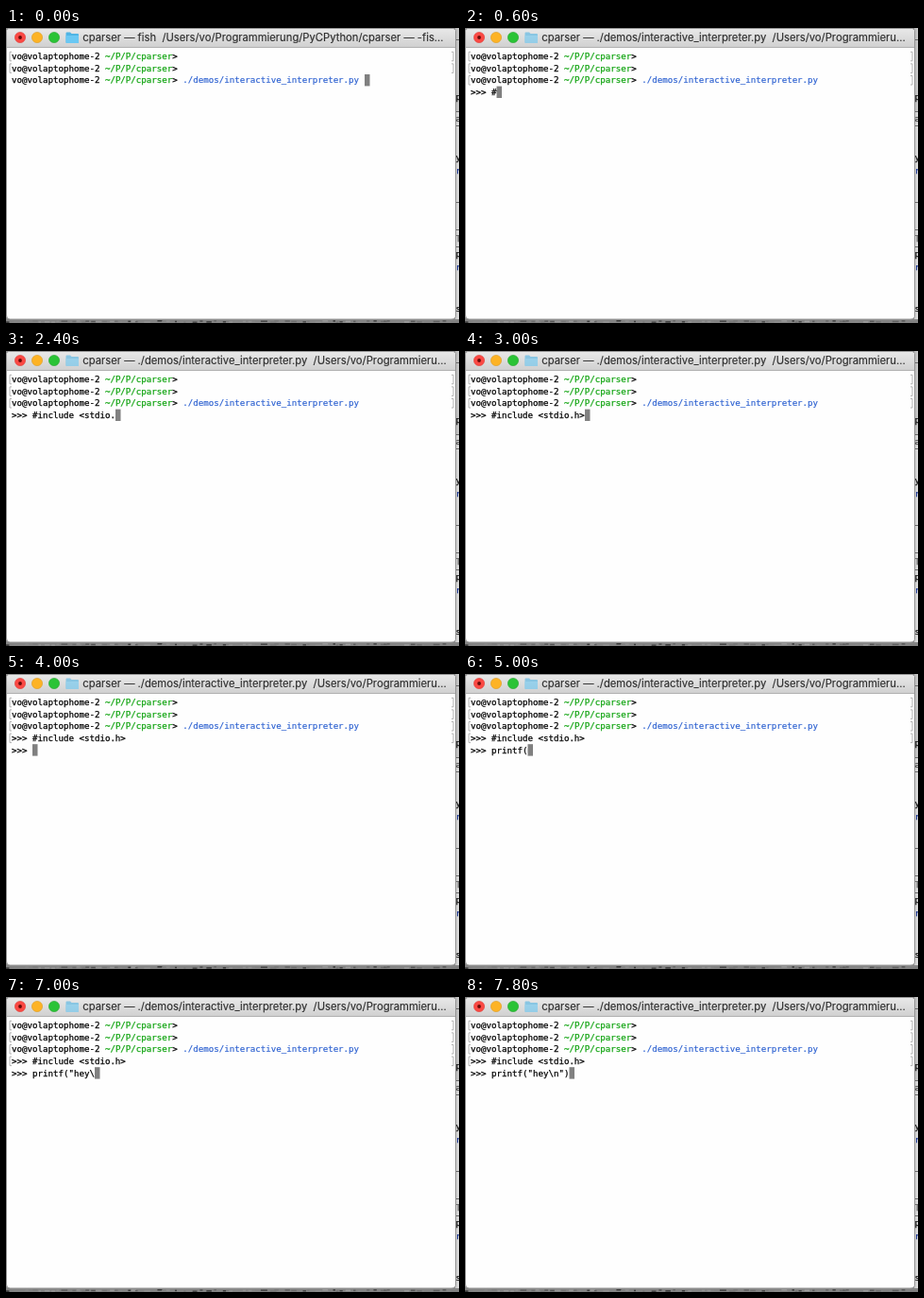
Recreate the animation shown at these times as an HTML page. Size 480 px wide and 312 px high, loop 8000 ms.

```html
<!DOCTYPE html>
<html lang="en">
<head>
<meta charset="utf-8">
<title>Terminal session</title>
<style>
  html, body { margin: 0; width: 100%; height: 100%; overflow: hidden; background: #c9c9c9; }
  svg { display: block; width: 100vw; height: 100vh; }
  text { white-space: pre; }
  .title { font: 11.25px Inter, Roboto, sans-serif; fill: #2e2e2e; stroke: #2e2e2e; stroke-width: .15; }
  .mono { font: 9.136px "DejaVu Sans Mono", "Liberation Mono", monospace; fill: #000; stroke: #000; stroke-width: .25; }
  .path { fill: #14a514; stroke: #14a514; }
  .cmd { fill: #2a5fd0; stroke: #2a5fd0; stroke-width: .15; }
  .mark { fill: none; stroke: #acacac; stroke-width: .9; }
</style>
</head>
<body>
<svg viewBox="0 0 480 312" preserveAspectRatio="none">
  <defs>
    <linearGradient id="bar" x2="0" y2="1">
      <stop offset="0" stop-color="#e8e8e8"/>
      <stop offset="1" stop-color="#d0d0d0"/>
    </linearGradient>
    <linearGradient id="shade">
      <stop offset="0" stop-color="#000" stop-opacity=".22"/>
      <stop offset="1" stop-color="#000" stop-opacity=".06"/>
    </linearGradient>
  </defs>

  <g id="behind">
    <rect width="480" height="312" fill="#858585"/>
    <rect x="476" width="4" height="308" fill="#f4f4f4"/>
    <rect x="476" width="4" height="88" fill="#dedede"/>
    <path d="M476 12.500h4M476 88.500h4M476 103.500h4M476 184.500h4M476 213.500h4M476 231.500h4" stroke="#777"/>
    <rect x="476" width="4" height="308" fill="url(#shade)"/>
  </g>

  <path d="M.5 20V4Q.5 .5 4 .5H472Q476.500 .5 476.500 4V304Q476.500 308 472 308H4Q.5 308 .5 304Z" fill="#fefefe" stroke="#979797"/>
  <path d="M1 20.500V4Q1 1 4 1H472Q476 1 476 4V20.500Z" fill="url(#bar)"/>
  <path d="M1 20.500H476" stroke="#b0b0b0"/>
  <circle cx="15" cy="10" r="5.600" fill="#fb4944" stroke="#dd3c37" stroke-width=".6"/>
  <circle cx="15" cy="10" r="1.900" fill="#650b08"/>
  <circle cx="33" cy="10" r="5.600" fill="#fdb325" stroke="#dc9a20" stroke-width=".6"/>
  <circle cx="51" cy="10" r="5.600" fill="#2ac336" stroke="#22a52c" stroke-width=".6"/>
  <g id="folder">
    <path d="M63.500 15V5.500Q63.500 4.500 64.500 4.500H68L69.500 6H76Q77 6 77 7V15Q77 16 76 16H64.500Q63.500 16 63.500 15Z" fill="#4fb4e4"/>
    <path d="M63.500 8H77V15Q77 16 76 16H64.500Q63.500 16 63.500 15Z" fill="#6ac8f3"/>
  </g>
  <text id="title" class="title" x="81.300" y="14.300"></text>

  <g id="marks" class="mark"></g>
  <rect id="cursor" width="5.500" height="12.400" fill="#808080"/>
  <g id="lines" class="mono"></g>
</svg>

<script>
const NS = 'http://www.w3.org/2000/svg';
const LOOP = 8000, CELL = 5.5, LEFT = 6, TOP = 23.8, ROW = 12.6;
const $ = id => document.getElementById(id);
const rowY = row => TOP + row * ROW;

function add(parent, tag, attrs, text = '') {
  const el = document.createElementNS(NS, tag);
  for (const key in attrs) el.setAttribute(key, attrs[key]);
  el.textContent = text;
  parent.appendChild(el);
  return el;
}

// Slivers of the windows underneath
const slivers = [
  [76, 'p', '#111'], [99, 'a', '#444'], [140, 'y', '#111'], [154, 'r', '#12308f'],
  [226, 'T', '#666'], [242, 'p', '#111'], [256, 'r', '#12308f'], [300, 's', '#111']
];
for (const [y, letter, color] of slivers)
  add($('behind'), 'text', { x: 476.5, y, class: 'mono', style: `fill:${color};stroke:${color}` }, letter);

let seed = 7;
const random = () => (seed = seed * 16807 % 2147483647) / 2147483647;
for (let x = 0; x < 480; x += 3 + random() * 7) {
  const tone = 50 + Math.floor(random() * 110);
  add($('behind'), 'rect', {
    x, y: 309 + random() * 1.5, width: 2 + random() * 5, height: 1.5, fill: `rgb(${tone},${tone},${tone})`
  });
}

const lines = [0, 1, 2, 3, 4].map(row =>
  add($('lines'), 'text', { x: LEFT, y: rowY(row) + 9.3 }));
for (let row = 0; row < 3; row++) {
  add(lines[row], 'tspan', {}, 'vo@volaptophome-2 ');
  add(lines[row], 'tspan', { class: 'path' }, '~/P/P/cparser');
  add(lines[row], 'tspan', {}, '> ');
}
add(lines[2], 'tspan', { class: 'cmd' }, './demos/interactive_interpreter.py');

const marks = [0, 1, 2, 3].map(row => {
  const y = rowY(row) + 1.5;
  return add($('marks'), 'path', { d: `M6 ${y}h-2v9.500h2M472 ${y}h2v9.500h-2` });
});

const titles = [
  'cparser — fish  /Users/vo/Programmierung/PyCPython/cparser — -fis…',
  'cparser — ./demos/interactive_interpreter.py  /Users/vo/Programmieru…'
];

const include = '#include <stdio.h>';
const call = 'printf("hey\\n")';

// Each step: time, row, typed text
const type = (row, text, keys) => keys.map(([at, count]) => [at, row, '>>> ' + text.slice(0, count)]);
const steps = [
  [200, 3, ''],
  ...type(3, include, [
    [400, 0], [600, 1], [800, 3], [1000, 4], [1200, 6], [1400, 8], [1600, 9],
    [1800, 10], [2000, 12], [2200, 14], [2400, 16], [2600, 17], [3000, 18]
  ]),
  ...type(4, call, [
    [3600, 0], [4200, 1], [4400, 3], [4600, 5], [4800, 6], [5000, 7],
    [5400, 8], [5600, 9], [5800, 10]
  ]),
  [6200, 4, '>>> printf("he\\'],
  ...type(4, call, [[6600, 10], [6800, 11], [7000, 12], [7200, 13], [7400, 14], [7800, 15]])
];

function draw(t) {
  const typed = ['', ''];
  let row = 2, col = 68;
  for (const [at, line, text] of steps) {
    if (at > t) break;
    typed[line - 3] = text;
    row = line;
    col = text.length;
  }
  lines[3].textContent = typed[0];
  lines[4].textContent = typed[1];
  marks.forEach((mark, i) => mark.setAttribute('visibility', i < row ? 'visible' : 'hidden'));
  $('cursor').setAttribute('x', LEFT + col * CELL);
  $('cursor').setAttribute('y', rowY(row));
  $('title').textContent = titles[row > 2 ? 1 : 0];
  $('folder').setAttribute('opacity', row > 2 ? .6 : 1);
}

const start = performance.now();
function tick() {
  draw((performance.now() - start) % LOOP);
  requestAnimationFrame(tick);
}
tick();
</script>
</body>
</html>
```
